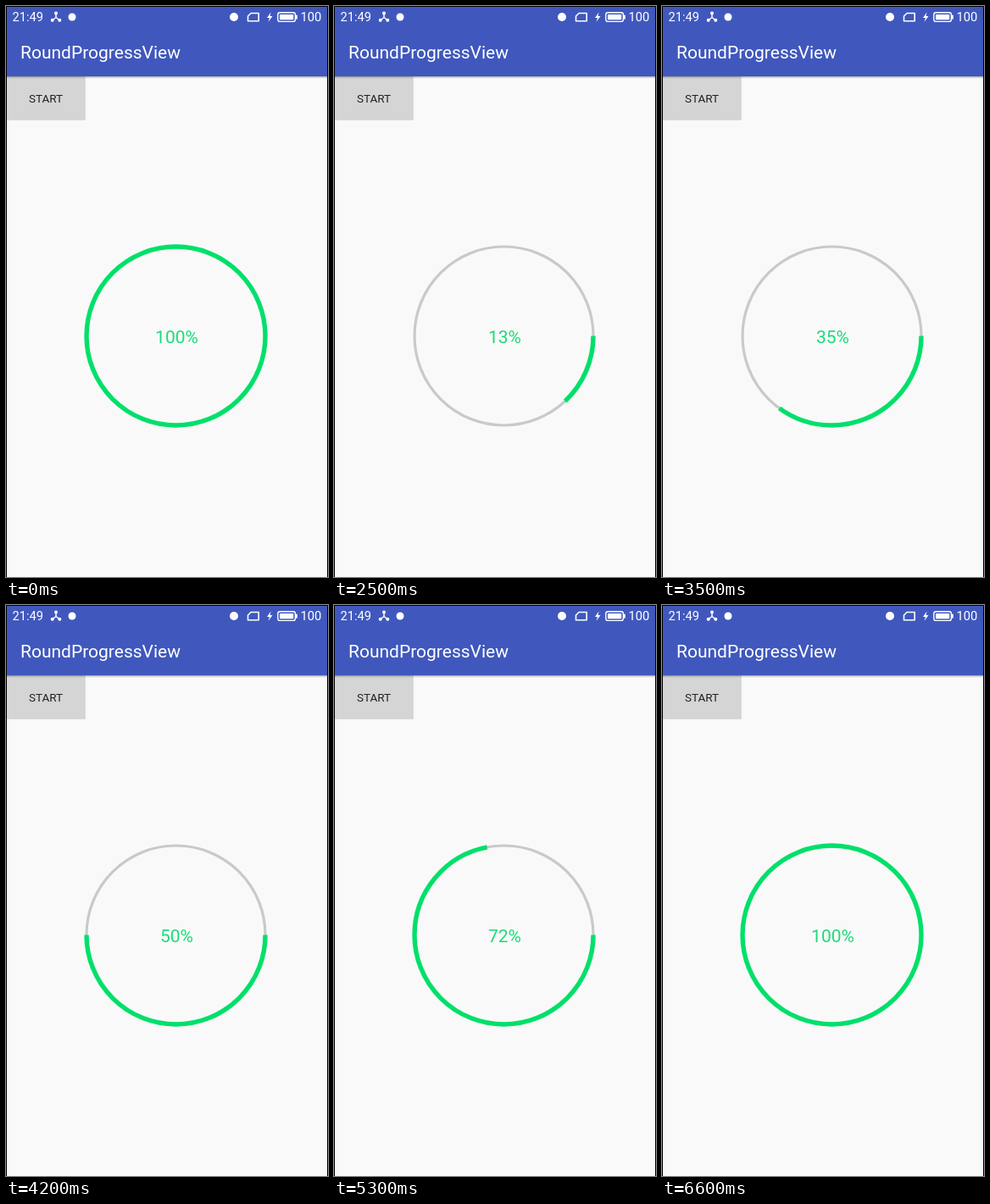
Recreate the animation shown at these times as an HTML page. Size 380x674 px, loop 9600 ms.

```html
<!DOCTYPE html>
<html lang="en">
<head>
<meta charset="utf-8">
<title>RoundProgressView</title>
<style>
  html, body { margin: 0; width: 100%; height: 100%; overflow: hidden; background: #f9f9f9; }
  svg { display: block; width: 380px; height: 674px; font-family: Roboto, sans-serif; }
  #bar { filter: drop-shadow(0 1px 1.2px rgba(0, 0, 0, .4)); }
</style>
</head>
<body>
<svg viewBox="0 0 380 674">
  <rect width="380" height="674" fill="#f9f9f9"/>

  <rect id="button" x="1" y="80" width="92.5" height="54.5" fill="#d5d5d5"/>
  <text x="47" y="114.3" font-size="13.5" text-anchor="middle" fill="#222">START</text>

  <rect id="bar" x="-5" y="-5" width="390" height="88" fill="#4058bd"/>
  <g fill="#fff">
    <text x="17" y="62" font-size="21">RoundProgressView</text>
    <text x="7.5" y="18.3" font-size="14.7">21:49</text>
    <text x="347.5" y="18.3" font-size="14.7">100</text>
    <!-- status icons -->
    <path d="M59 8V13.5L54.5 17M59 13.5L63.5 17" fill="none" stroke="#fff" stroke-width="1.5"/>
    <circle cx="59" cy="8.5" r="2"/>
    <circle cx="54.7" cy="16.8" r="2"/>
    <circle cx="63.3" cy="16.8" r="2"/>
    <circle cx="78" cy="13" r="4.5"/>
    <circle cx="269" cy="13" r="5"/>
    <path d="M289 8.5H298.2V17.8H285.5V12Z" fill="none" stroke="#fff" stroke-width="1.6" stroke-linejoin="round"/>
    <path d="M312.5 7.5L308 14H311L309.5 18.8L314.5 12H311.5Z"/>
    <rect x="320.8" y="7.8" width="20.6" height="10.6" rx="2.4" fill="none" stroke="#fff" stroke-width="1.4"/>
    <rect x="323" y="10" width="16.2" height="6.2" rx=".6"/>
    <rect x="342" y="10.5" width="1.8" height="5.2" rx=".8"/>
  </g>

  <g fill="none">
    <circle cx="200.5" cy="389.5" r="105.5" stroke="#c9c9c9" stroke-width="3.2"/>
    <circle id="arc" cx="200.5" cy="389.5" r="105.5" stroke="#00e06a" stroke-width="5.4" pathLength="100"/>
  </g>
  <text id="label" x="201.5" y="397.5" font-size="21" text-anchor="middle" fill="#1bdc77"></text>

  <path d="M.5 674V.5H379.5V674" fill="none" stroke="#000"/>
</svg>
<script>
  const LOOP = 9600, STEP = 100, PRESS = 1900;
  const arc = document.getElementById('arc');
  const label = document.getElementById('label');
  const button = document.getElementById('button');

  // [time in ms, percent]; the counter stalls briefly at 69 %
  const knots = [[2000, 2], [2500, 13], [3500, 35], [4200, 50],
                 [5100, 69], [5200, 69], [5300, 72], [6600, 100]];

  function progressAt(time) {
    const next = knots.findIndex(([t]) => t > time);
    if (next < 1) return 100;
    const [t0, p0] = knots[next - 1], [t1, p1] = knots[next];
    return Math.round(p0 + (p1 - p0) * (time - t0) / (t1 - t0));
  }

  function draw(now) {
    const time = Math.floor(now % LOOP / STEP) * STEP;
    const percent = progressAt(time);
    arc.setAttribute('stroke-dasharray', percent < 100 ? `${percent} 100` : 'none');
    label.textContent = percent + '%';

    const press = time < PRESS ? 0 : Math.max(0, 1 - (time - PRESS) / 300);
    const grey = 213 - 4 * press;
    button.setAttribute('fill', `rgb(${grey},${grey},${grey})`);
    button.style.filter =
      `drop-shadow(0 ${.4 + press}px ${.4 + press}px rgba(0,0,0,${.2 + .2 * press}))`;
  }

  const start = performance.now();
  function frame() {
    draw(performance.now() - start);
    requestAnimationFrame(frame);
  }
  frame();
</script>
</body>
</html>
```
